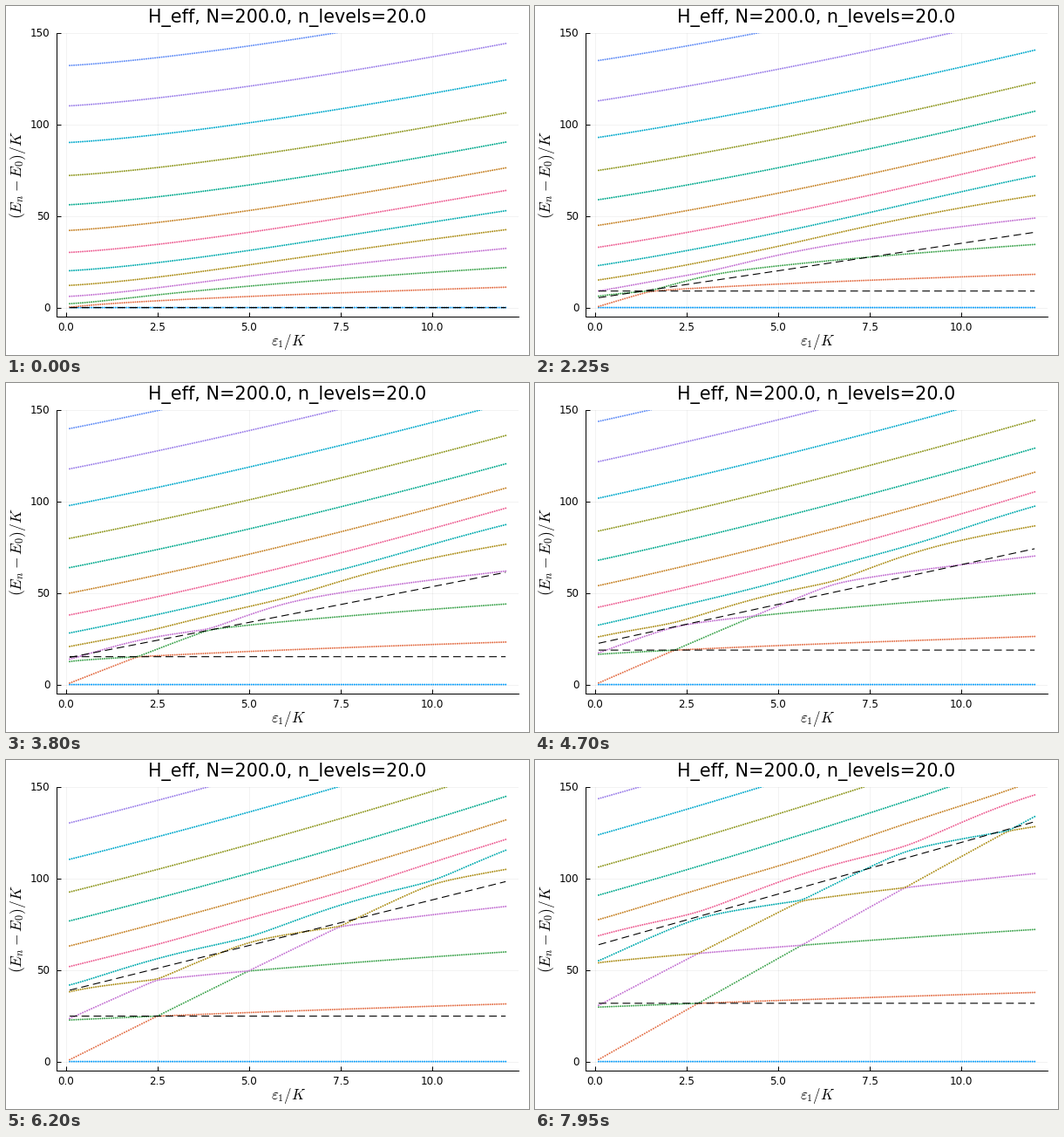
Animation of 600 by 400 pixels, one loop 8 s. Source, as a matplotlib script:

```python
import numpy as np
import matplotlib.pyplot as plt
from matplotlib.animation import FuncAnimation

W, H, DPI = 600, 400, 100
PX = 72 / DPI                      # one pixel in points
FRAMES, INTERVAL = 160, 50
LEFT, RIGHT, TOP, BOTTOM = 58, 588.2, 30.6, 356.1
COLORS = ["#009AFA", "#E36F47", "#3EA44E", "#C371D2", "#AC8E18", "#00AAAE",
          "#ED5E93", "#C68225", "#00A98D", "#8E971E", "#00A9CC", "#9B7FE9",
          "#618DF6"]

plt.rcParams["font.family"] = "DejaVu Sans"
plt.rcParams["mathtext.fontset"] = "cm"
plt.rcParams["path.simplify"] = False

# Kerr oscillator in the Fock basis with one- and two-photon drives
DIM = 40
a = np.diag(np.sqrt(np.arange(1, DIM)), 1)
kerr = a.T @ a.T @ a @ a
drive = a + a.T
squeeze = a @ a + a.T @ a.T
eps1 = np.linspace(0.1, 12, 120)
dot_x = np.linspace(0.1, 12, 200)


def spectrum(eps2):
    ham = kerr - eps2 * squeeze - eps1[:, None, None] * drive
    energy = np.linalg.eigvalsh(ham)
    return (energy - energy[:, :1])[:, :len(COLORS)].T


fig = plt.figure(figsize=(W / DPI, H / DPI), dpi=DPI, facecolor="white")
ax = fig.add_axes([LEFT / W, 1 - BOTTOM / H, (RIGHT - LEFT) / W,
                   (BOTTOM - TOP) / H])
margin = 0.03 * (eps1[-1] - eps1[0])
ax.set_xlim(eps1[0] - margin, eps1[-1] + margin)
ax.set_ylim(-5, 150)
ax.set_xticks([0, 2.5, 5, 7.5, 10])
ax.set_yticks([0, 50, 100, 150])
ax.tick_params(direction="in", length=5 * PX, width=PX,
               labelleft=False, labelbottom=False)
ax.set_axisbelow(True)
ax.grid(color="black", alpha=0.1, linewidth=0.5 * PX)
for side in ("top", "right"):
    ax.spines[side].set_visible(False)
for side in ("left", "bottom"):
    ax.spines[side].set_linewidth(PX)


def label(x, y, text, size, **kw):
    kw = {"ha": "center", "va": "baseline", **kw}
    fig.text(x / W, 1 - y / H, text, fontsize=size * PX, **kw)


def to_px(x, y):
    px, py = ax.transData.transform((x, y))
    return px, H - py


label(323, 19, "H_eff, N=200.0, n_levels=20.0", 20.8)
for tick in ax.get_xticks():
    label(to_px(tick, 0)[0], 371.5, f"{tick:.1f}", 11.9)
for tick in ax.get_yticks():
    label(50.5, to_px(0, tick)[1] + 4.2, f"{tick:.0f}", 11.9, ha="right")
label(324, 388.5, r"$\varepsilon_1/K$", 16.9)
label(13.8, 193.5, r"$(E_n - E_0)/K$", 17.4, rotation=90, va="center")


def dots(x, y):
    """Tiny separate strokes whose round caps make one dot per point."""
    gap = np.full_like(x, np.nan)
    return (np.column_stack([x, x + 1e-3, gap]).ravel(),
            np.column_stack([y, y, gap]).ravel())


levels = [ax.plot([], [], color=c, lw=2 * PX, solid_capstyle="round",
                  snap=False)[0] for c in COLORS]
flat, slope = [ax.plot([], [], color="black", lw=1.1 * PX, ls=(0, (8, 4.5)),
                       dash_capstyle="butt", snap=False)[0] for _ in range(2)]


def draw(i):
    eps2 = 0.05 * i
    for line, energy in zip(levels, spectrum(eps2)):
        line.set_data(*dots(dot_x, np.interp(dot_x, eps1, energy)))
    flat.set_data(eps1, np.full_like(eps1, 4 * eps2))
    slope.set_data(eps1, eps2 ** 2 + 2 * eps1 * np.sqrt(eps2))
    return levels + [flat, slope]


anim = FuncAnimation(fig, draw, frames=FRAMES, interval=INTERVAL,
                     repeat=True, repeat_delay=0, blit=False)
plt.show()
```
